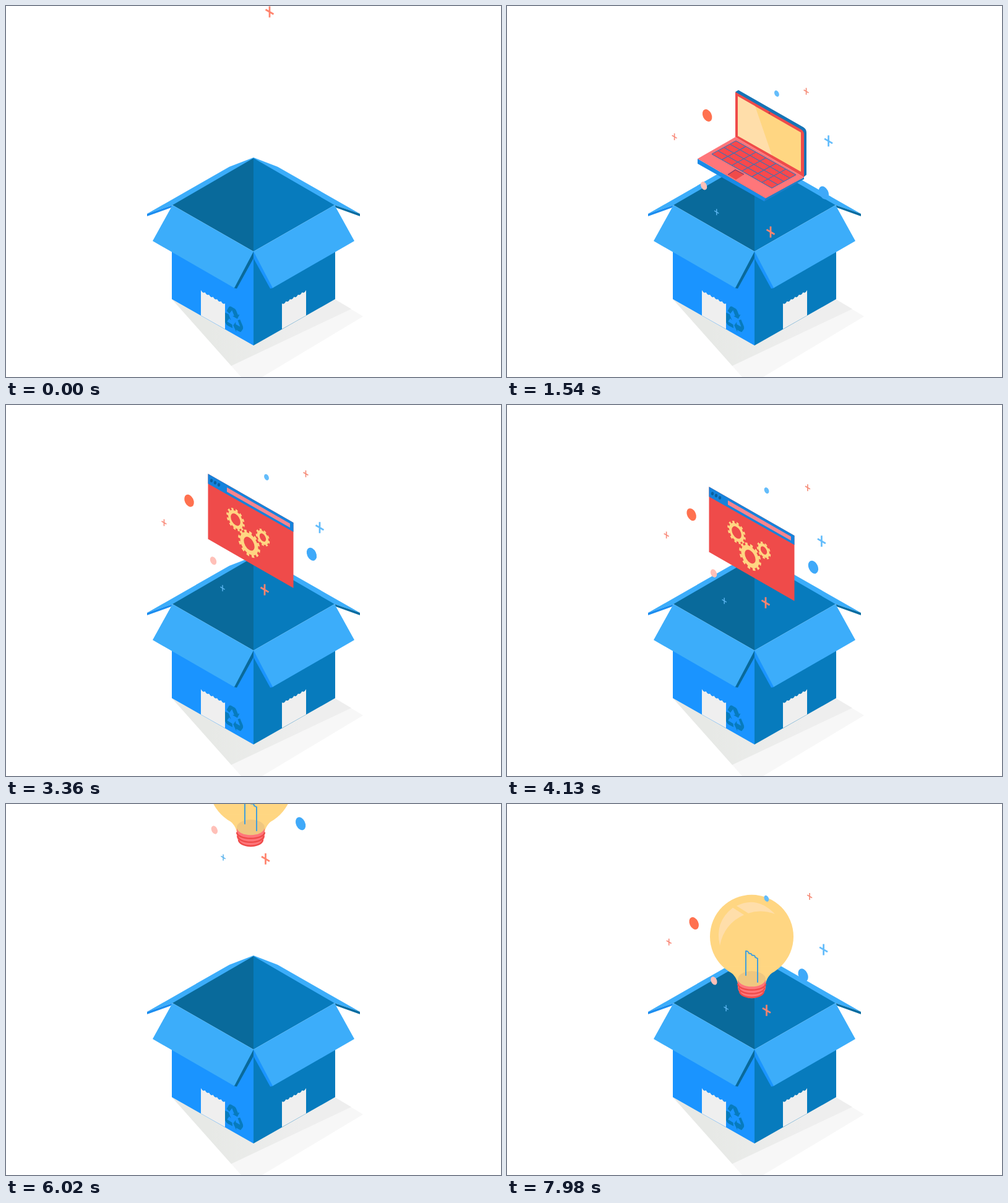
Recreate the animation shown at these times as an HTML page. Size 800 by 600 pixels, loop 8000 ms.

```html
<!DOCTYPE html>
<html lang="en">
<head>
<meta charset="utf-8">
<title>Things dropping into a box</title>
<style>
html, body { margin: 0; width: 100%; height: 100%; overflow: hidden; background: #fff; }
svg { display: block; width: 100%; height: 100%; }
</style>
</head>
<body>
<svg id="stage" viewBox="0 0 800 600"></svg>
<script>
const poly = (pts, fill) => `<polygon points="${pts}" fill="${fill}"/>`;
const path = (d, fill) => `<path d="${d}" fill="${fill}"/>`;
const line = (d, color, w) => `<path d="${d}" fill="none" stroke="${color}" stroke-width="${w}" stroke-linejoin="round"/>`;
const iso = (x, y) => `transform="matrix(.866 .5 0 1 ${x} ${y})"`;
const repeat = (n, f) => Array.from({ length: n }, (_, i) => f(i)).join('');
const RED = '#ef4b4a', PINK = '#ff767a', GOLD = '#ffd682', PALE = '#ffdeaa';
const SKY = '#3cadfa', BLUE = '#1a94ff', SIDE = '#077bbd', DEEP = '#096a9b';

function recycle() {
  const arrow = 'M-12,-8l4,-8q2,-3 5,-3h6q2,0 3,2l3,5 3,-2 -4,9 -9,0 3,-2 -4,-7 -5,8z';
  return `<g ${iso(367, 507)} fill="${SIDE}">` +
    repeat(3, i => `<path d="${arrow}" transform="rotate(${i * 120})"/>`) + '</g>';
}

// Left half of the box; the right half is its mirror image in other shades
function half(edge, inside, face, strip, mark) {
  return poly('400,245 361,260 228,336 269,322 400,300', SKY) +
    poly('228,336 228,340 267,326 269,322', edge) +
    poly('400,246 269,322 400,397', inside) +
    poly('268,360 268,474 400,549 400,397', face) + mark +
    path('M315,459.5' + 'q3.25,5.8 6.5,3.6'.repeat(6) + 'V522.5L315,500.5Z', '#efefef') +
    poly('400,397 368,456 373,457 400,408', strip) +
    poly('269,322 400,397 369,456 237,380', SKY);
}

function box() {
  return '<linearGradient id="shade" gradientUnits="userSpaceOnUse" x1="330" x2="480">' +
    '<stop stop-color="#e7e9e6"/><stop offset="1" stop-color="#eee"/></linearGradient>' +
    poly('268,474 380,600 414,600 577,502 531,474', '#f7f7f7') +
    poly('268,474 364,582 558,490 531,474', 'url(#shade)') +
    half('#1a8cef', DEEP, BLUE, DEEP, recycle()) +
    `<g transform="matrix(-1 0 0 1 800 0)">${half('#066ba0', SIDE, SIDE, BLUE, '')}</g>`;
}

function laptop() {
  const at = (a, b) => `${370 + 97 * a - 39 * b},${222 + 55 * a + 21.5 * b}`;
  const grid = repeat(7, i => `M${at(i / 6, 0)}L${at(i / 6, 1)}`) +
    repeat(5, i => `M${at(0, i / 4)}L${at(1, i / 4)}`);
  return path('M369,143L374,140 479,200Q484,203 484,209V277L479,281Z', '#1574b6') +
    path('M369,143L476,204Q480,207 480,212V281L369,216Z', RED) +
    poly('373,150 475,208.500 475,272 373,214', GOLD) +
    poly('373,150 401,166 428,245 373,214', PALE) +
    '<circle cx="424" cy="177" r="1.3" fill="#a43c48"/>' +
    poly('308,251 418,315 416,320 308,259', '#188be8') +
    poly('418,315 480,281 480,284 416,320', '#1b7fc8') +
    poly('369,216 480,281 418,315 308,251', PINK) +
    poly([at(0, 0), at(1, 0), at(1, 1), at(0, 1)].join(' '), '#f9494c') +
    line(grid, '#4670ae', 1.2) +
    poly('357,277 369,269 383,276.500 370,285', RED) +
    line('M357,277L369,269 383,276.500', '#8d4068', 1.4);
}

function gear(x, y, r, hole, teeth) {
  const body = r * .82;
  return `<g ${iso(x, y)} fill="none" stroke="${GOLD}">` +
    `<circle r="${(body + hole) / 2}" stroke-width="${body - hole}"/>` +
    `<circle r="${r * .9}" stroke-width="${r * .2}" pathLength="${teeth * 2}" stroke-dasharray="1"/></g>`;
}

function browser() {
  return poly('326.500,137 464.500,216 464.500,321.800 326.500,242.500', RED) +
    poly('326.500,137 464.500,216 464.500,231 326.500,153', '#1583dc') +
    poly('357,159 459,217.500 459,224 357,166', '#f9848c') +
    repeat(3, i => `<ellipse cx="${332 + i * 6}" cy="${148 + i * 3.4}" rx="2.2" ry="2.8" fill="#0b5f9e"/>`) +
    gear(371, 211, 17, 9, 12) + gear(393, 250, 20.5, 10, 12) + gear(415, 240, 13, 6, 9);
}

function bulb() {
  const thread = i => line(`M${373 + i * 1.5},${290 + i * 6}A${22.5 - i * 1.5},10 0 0 0 ${418 - i * 1.5},${290 + i * 6}`, RED, 2.5);
  return `<circle cx="395.500" cy="213.500" r="67.500" fill="${GOLD}"/>` +
    path('M349,262Q371,275 373,290H418Q420,275 442,262Z', GOLD) +
    path('M373,284V297Q374,304 382,309Q395.500,318 409,309Q417,304 418,297V284Z', PINK) + repeat(3, thread) +
    '<ellipse cx="395.500" cy="282" rx="22.500" ry="12.500" fill="#efc780"/>' +
    path('M344,228Q335,190 365,167L383,178.500Q351,193 344,228Z', PALE) +
    path('M371,164Q404,147 433,177Q410,169 390,176Z', PALE) +
    line('M386,277V237q4,0 5,4q4,-1 5,3q5,-1 5,3l4,2V288', '#429fdc', 2);
}

// Confetti: each piece has a shape and a slow drift of its own
const dot = (size, fill, dx, dy) => ({ dx, dy,
  art: `<ellipse rx="${size * .67}" ry="${size}" fill="${fill}" transform="rotate(-25)"/>` });
const cross = (size, stroke, dx, dy) => ({ dx, dy,
  art: line(`M0,${-size}V${size}M${-size * .72},${-size * .42}L${size * .72},${size * .42}`, stroke, size * .3) });
const confetti = [
  dot(10.5, '#ff714f', 4.5, 3), dot(5.3, '#64bdfb', -3, 1),
  cross(5.5, '#f58c78', 3, 3), cross(5.5, '#f98c7c', 4.5, -2), cross(9, '#64bdfb', 3, 2),
  dot(7, '#ffc0b8', -2, -1), cross(5, '#58b2ec', 2.5, -1), cross(9, '#ff846e', 0, 0),
  dot(11, '#3fa9f9', 2, 0)
];

// Where the confetti hangs while the object hovers
const near = [[325, 182], [435, 146], [484.5, 143], [272, 215], [520.5, 223], [317.5, 294.5], [339.5, 337], [426, 369.5], [512.5, 306]];
const wide = [[300.5, 183.5], [418, 143.5], [487.5, 140], [260, 214], [510, 226], [333, 276.5], [352.5, 321], [418, 324.5]];
const scenes = [
  { art: laptop(), spots: near, shift: [0, 0] },
  { art: browser(), spots: [...wide, [496, 267]], shift: [0, 0] },
  { art: bulb(), spots: [...wide, [477, 267.5]], shift: [1.5, 8.5] }
];

// Ease with control points (a, 0) and (b, 1)
function ease(x, a, b) {
  if (x <= 0) return 0;
  if (x >= 1) return 1;
  let lo = 0, hi = 1, s;
  for (let i = 0; i < 30; i++) {
    s = (lo + hi) / 2;
    const q = 1 - s;
    if (3 * q * q * s * a + 3 * q * s * s * b + s * s * s < x) lo = s; else hi = s;
  }
  return s * s * (3 - 2 * s);
}

// Drop in, rise a little while hovering, then sink into the box
function height(t) {
  const enter = -360 * (1 - ease(t / 673, .32, .05));
  const bob = t > 700 && t < 1900 ? -5 * Math.sin(Math.PI * (t - 700) / 1200) : 0;
  return enter + bob + 300 * ease((t - 2036) / 800, .9, .6);
}

const stage = document.getElementById('stage');
stage.innerHTML =
  '<clipPath id="opening"><path d="M0,0H800V322H531L400,397 269,322H0Z"/></clipPath>' + box() +
  '<g clip-path="url(#opening)">' + scenes.map(s =>
    `<g class="scene">${s.art}${confetti.map(c => `<g class="bit">${c.art}</g>`).join('')}</g>`).join('') + '</g>';
const groups = [...stage.querySelectorAll('.scene')];
const bits = groups.map(g => [...g.querySelectorAll('.bit')]);

const LOOP = 8000, STEP = 70, TURN = 2940, HOVER = 2030;
function draw(now) {
  const time = Math.floor((now % LOOP) / STEP) * STEP;
  const current = Math.floor(time / TURN), t = time % TURN;
  groups.forEach((g, i) => g.setAttribute('display', i === current ? 'inline' : 'none'));
  groups[current].setAttribute('transform', `translate(0 ${height(t)})`);
  const { spots, shift } = scenes[current], k = (t - HOVER) / 1600;
  confetti.forEach(({ dx, dy }, i) => {
    const x = spots[i][0] + shift[0] + dx * k, y = spots[i][1] + shift[1] + dy * k;
    bits[current][i].setAttribute('transform', `translate(${x} ${y})`);
  });
}

const start = performance.now();
function tick() {
  draw(performance.now() - start);
  requestAnimationFrame(tick);
}
tick();
</script>
</body>
</html>
```
